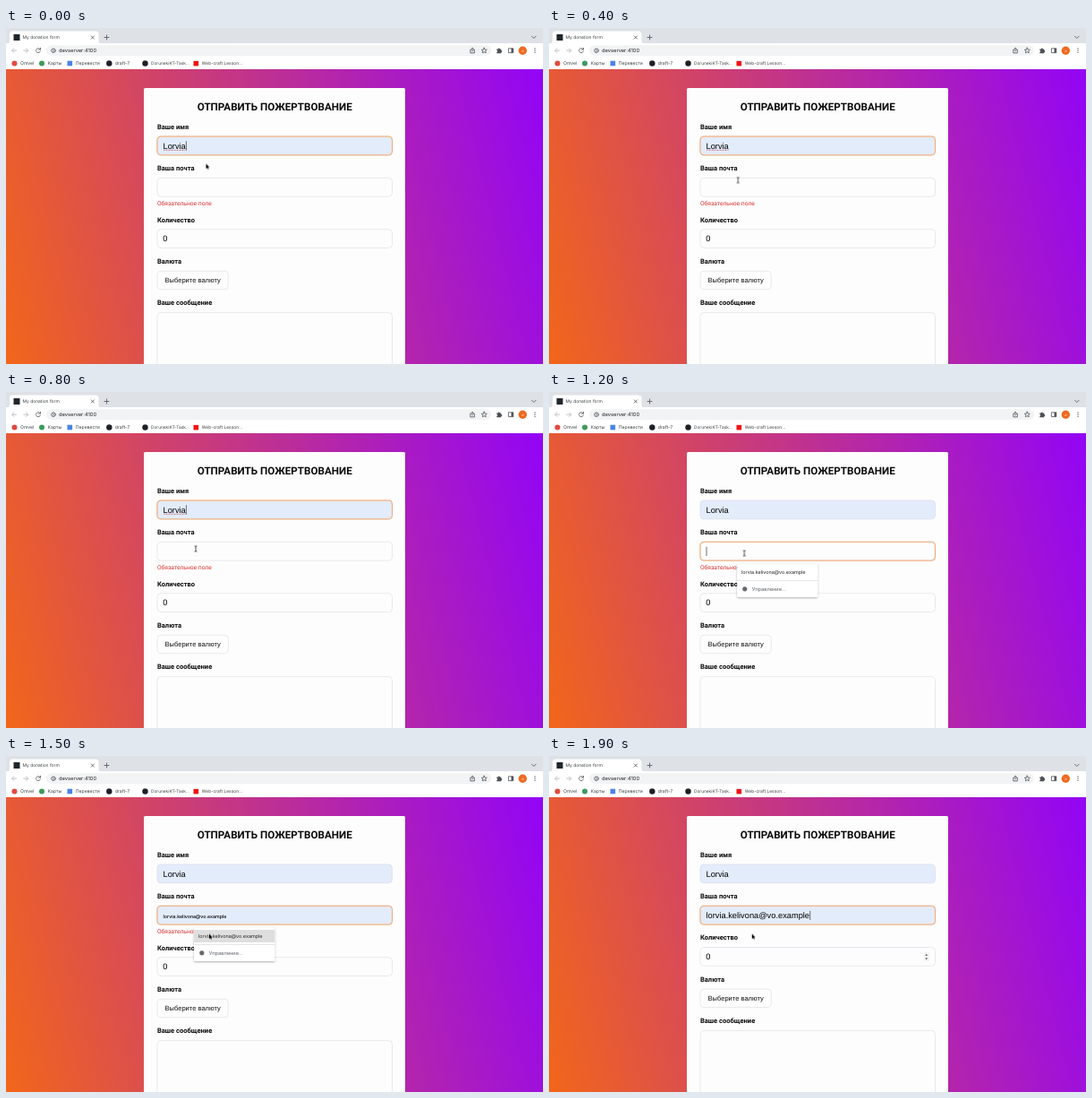
Write an HTML page that moves like this. It is 600 px wide and 375 px high and loops after 2000 ms.

```html
<!DOCTYPE html>
<html lang="ru">
<head>
<meta charset="utf-8">
<title>My donation form</title>
<style>
  html, body { margin: 0; width: 100%; height: 100%; overflow: hidden; background: #fff; }
  .page {
    position: absolute; left: 0; top: 46px; width: 600px; height: 329px;
    background: linear-gradient(76deg, #f2661a, #8f00ff 104%);
  }
  svg { position: absolute; left: 0; top: 0; display: block; }
  text { text-rendering: geometricPrecision; white-space: pre; }

  .ui { font-family: Inter, Roboto, sans-serif; font-size: 5.1px; fill: #3c4043; }
  .title { font: 700 11.65px Roboto, sans-serif; text-anchor: middle; fill: #0b0b0b; }
  .label { font: 700 7.55px Roboto, sans-serif; fill: #0b0b0b; }
  .error { font: 400 6.7px Roboto, sans-serif; fill: #d9302c; }
  .value { font: 400 9.28px "Liberation Sans", Arial, sans-serif; fill: #000; }
  .button { font: 400 7.55px "Liberation Sans", Arial, sans-serif; fill: #111; }
  .hint { font: 400 5.45px Inter, Roboto, sans-serif; fill: #222; }

  .line { fill: none; stroke: #5f6368; stroke-width: .9; stroke-linecap: round; stroke-linejoin: round; }
  .faint { stroke: #b9bcc0; }
  .box { fill: #fefdfe; stroke: #e9e8ec; stroke-width: 1; }
  .filled { fill: #e3ecfb; stroke: #dfe4ee; }
  .glow { fill: none; stroke: #f8e3d2; stroke-width: 1.8; }
  .ring { fill: none; stroke: #e8a472; stroke-width: .8; }
  .caret { stroke: #333; stroke-width: .7; }

  /* Every part shares the two-second clock and changes in hard steps. */
  .act { animation: 2s step-end infinite; }
  .name-focus { animation-name: nameFocus; }
  .name-caret { animation-name: nameCaret; }
  .mail-focus { animation-name: mailFocus; }
  .mail-caret { animation-name: mailCaret; }
  .mail-fill { animation-name: mailFill; }
  .preview { animation-name: preview; }
  .menu { animation-name: menu; }
  .done { animation-name: done; }
  .invalid { animation-name: invalid; }
  .lower { animation-name: lower; }
  .pointer { animation-name: move; }
  .arrow { animation-name: arrow; }
  .beam { animation-name: beam; }

  @keyframes nameFocus { 0% { visibility: visible } 50%, 100% { visibility: hidden } }
  @keyframes nameCaret {
    0% { visibility: visible } 15% { visibility: hidden }
    40% { visibility: visible } 50%, 100% { visibility: hidden }
  }
  @keyframes mailFocus { 0% { visibility: hidden } 50%, 100% { visibility: visible } }
  @keyframes mailCaret { 0% { visibility: hidden } 50% { visibility: visible } 70%, 100% { visibility: hidden } }
  @keyframes mailFill { 0% { visibility: hidden } 70%, 100% { visibility: visible } }
  @keyframes preview { 0% { visibility: hidden } 70% { visibility: visible } 85%, 100% { visibility: hidden } }
  @keyframes menu { 0% { visibility: hidden } 50% { visibility: visible } 85%, 100% { visibility: hidden } }
  @keyframes done { 0% { visibility: hidden } 85%, 100% { visibility: visible } }
  @keyframes invalid { 0% { visibility: visible } 85%, 100% { visibility: hidden } }
  @keyframes lower { 0% { transform: none } 85%, 100% { transform: translateY(-11.2px) } }
  @keyframes arrow { 0% { visibility: visible } 20% { visibility: hidden } 65%, 100% { visibility: visible } }
  @keyframes beam { 0% { visibility: hidden } 20% { visibility: visible } 65%, 100% { visibility: hidden } }
  @keyframes move {
    0% { transform: translate(223.5px, 151.5px) }
    5% { transform: translate(221px, 154px) }
    10% { transform: translate(217px, 159px) }
    15% { transform: translate(213px, 165px) }
    20% { transform: translate(211.2px, 169.8px) }
    25% { transform: translate(211px, 171.2px) }
    30% { transform: translate(210.8px, 172.4px) }
    35% { transform: translate(210.8px, 173.2px) }
    40% { transform: translate(212px, 175px) }
    45% { transform: translate(214px, 177px) }
    50% { transform: translate(217px, 179.5px) }
    60% { transform: translate(218.2px, 180px) }
    65% { transform: translate(221px, 188px) }
    70% { transform: translate(225px, 196px) }
    75% { transform: translate(227px, 198.5px) }
    85%, 100% { transform: translate(226.7px, 198.5px) }
  }
</style>
</head>
<body>
<div class="page"></div>
<svg width="600" height="375" viewBox="0 0 600 375">
  <defs>
    <filter id="shadow" x="-10%" y="-20%" width="120%" height="150%">
      <feDropShadow dx="0" dy=".8" stdDeviation="1.2" flood-opacity=".35"/>
    </filter>
    <rect id="field" x="169" y="121" width="262.5" height="20.8" rx="4"/>
  </defs>

  <!-- Browser frame -->
  <rect width="600" height="17.5" fill="#dee1e6"/>
  <rect y="17" width="600" height="29" fill="#fff"/>
  <path d="M1 17.5Q4 17.5 4 14V7Q4 3.5 7.5 3.5H100Q103.5 3.5 103.5 7V14Q103.5 17.5 106.5 17.5Z" fill="#fff"/>
  <rect x="8.5" y="7" width="7" height="7" fill="#20272c"/>
  <text class="ui" x="18.5" y="12.3" style="font-size:4.95px">My donation form</text>
  <path class="line" d="M95.2 8.9l3.2 3.2m0-3.2l-3.2 3.2M110 10.5h5m-2.5-2.5v5M587.5 9.2l2.3 2.3l2.3-2.3"/>

  <path class="line faint" d="M11.6 25.2H6.8m2.2-2.3l-2.3 2.3l2.3 2.3M19.8 25.2h4.8m-2.2-2.3l2.3 2.3l-2.3 2.3"/>
  <path class="line" d="M38.1 23.7A2.5 2.5 0 1 0 38.4 26M38.5 22.3v1.8h-1.8"/>
  <rect x="45" y="19.3" width="497" height="11.8" rx="5.9" fill="#f1f3f4"/>
  <circle class="line" cx="53" cy="25.2" r="2.3" stroke-width=".7"/>
  <path class="line" d="M53 25.1v1.2M53 23.9v.1" stroke-width=".7"/>
  <text class="ui" x="59" y="27.3" style="font-size:5.75px;fill:#202124">devserver:4100</text>
  <path class="line" d="M519.8 24.2h-1v3.7h4.6v-3.7h-1M521.1 26v-3.7m-1.2 1.1l1.2-1.2l1.2 1.2" stroke-width=".7"/>
  <path class="line" d="M534.3 22.1l.9 2l2.1.2l-1.6 1.4l.5 2.1l-1.9-1.1l-1.9 1.1l.5-2.1l-1.6-1.4l2.1-.2z" stroke-width=".7"/>
  <path d="M548.3 23.4h1.5a1 1 0 0 1 2 0h1.5v1.5a1 1 0 0 1 0 2v1.4h-5v-1.6a.9.9 0 0 0 0-1.8z" fill="#4d5156"/>
  <rect class="line" x="561.8" y="22.8" width="5" height="4.8"/>
  <rect x="564.5" y="22.8" width="2.3" height="4.8" fill="#4d5156"/>
  <circle cx="577.3" cy="25.2" r="4.7" fill="#ee6a20"/>
  <text x="577.3" y="26.6" text-anchor="middle" font-family="Roboto, sans-serif" font-size="4" fill="#fff">л</text>
  <g fill="#5f6368">
    <circle cx="591" cy="23" r=".7"/><circle cx="591" cy="25.2" r=".7"/><circle cx="591" cy="27.4" r=".7"/>
  </g>

  <!-- Bookmarks -->
  <circle cx="9.5" cy="39.5" r="3" fill="#e04a3f"/>
  <circle cx="40" cy="39.5" r="3" fill="#3f9a5b"/>
  <rect x="68.5" y="36.7" width="5.6" height="5.6" fill="#4a83e8"/>
  <circle cx="115.3" cy="39.5" r="3.2" fill="#1d2125"/>
  <circle cx="155.5" cy="39.5" r="3.2" fill="#1d2125"/>
  <rect x="209.5" y="36.8" width="5.6" height="5.6" fill="#f01414"/>
  <g class="ui">
    <text x="16" y="41.3">Omvel</text>
    <text x="46.6" y="41.3">Карты</text>
    <text x="77.8" y="41.3">Перевести</text>
    <text x="121.8" y="41.3">draft-7</text>
    <text x="162" y="41.3" style="font-size:4.8px">DorunekiKT-Task...</text>
    <text x="218.8" y="41.3" style="font-size:4.9px">Web-craft Lesson...</text>
  </g>

  <!-- Form -->
  <rect x="154" y="67" width="292" height="320" rx="1.5" fill="#fefdfe"/>
  <text class="title" x="300.3" y="92.4">ОТПРАВИТЬ ПОЖЕРТВОВАНИЕ</text>

  <text class="label" x="169" y="113">Ваше имя</text>
  <use href="#field" class="box filled"/>
  <g class="act name-focus">
    <use href="#field" class="glow"/>
    <use href="#field" class="ring"/>
    <path d="M176 136.3H200.5" stroke="#c0585c" stroke-width=".8" stroke-dasharray="1 .5"/>
  </g>
  <text class="value" x="175.5" y="134.6">Lorvia</text>
  <path class="act name-caret caret" d="M201.4 126.3v10.4"/>

  <text class="label" x="169" y="159.2">Ваша почта</text>
  <g transform="translate(0 46.3)">
    <use href="#field" class="box"/>
    <use href="#field" class="act mail-fill box filled"/>
    <g class="act mail-focus">
      <use href="#field" class="glow"/>
      <use href="#field" class="ring"/>
    </g>
  </g>
  <path class="act mail-caret caret" d="M176 172.8v10.2"/>
  <text class="act preview hint" x="175.5" y="180.6" style="font-size:5.3px;font-weight:500;fill:#000">lorvia.kelivona@vo.example</text>
  <g class="act done">
    <text class="value" x="175.5" y="180.8">lorvia.kelivona@vo.example</text>
    <path class="caret" d="M291.7 172.8v10.2"/>
  </g>
  <text class="act invalid error" x="169" y="197.7">Обязательное поле</text>

  <g class="act lower">
    <text class="label" x="169" y="216.6">Количество</text>
    <use href="#field" class="box" y="103.7"/>
    <text class="value" x="175.3" y="238.4">0</text>
    <g class="act done">
      <rect x="418.5" y="230.2" width="6.4" height="10.2" rx="1" fill="#f2f1f3"/>
      <path d="M420.3 234l1.4-1.8l1.4 1.8zM420.3 236.6l1.4 1.8l1.4-1.8z" fill="#444"/>
    </g>
    <text class="label" x="169" y="262.8">Валюта</text>
    <rect class="box" x="169" y="271.3" width="79.3" height="20.5" rx="4"/>
    <text class="button" x="177.5" y="284.2">Выберите валюту</text>
    <text class="label" x="169" y="309">Ваше сообщение</text>
    <rect class="box" x="169" y="317.6" width="262.5" height="90" rx="4"/>
  </g>

  <!-- Suggestions -->
  <g class="act menu">
    <rect x="210.2" y="191.5" width="90" height="37.5" rx="1" fill="#fff" filter="url(#shadow)"/>
    <rect class="act preview" x="210.2" y="194" width="90" height="14" fill="#dedede"/>
    <text class="hint" x="215" y="203">lorvia.kelivona@vo.example</text>
    <path d="M210.2 210.5h90" stroke="#dcdcdc" stroke-width=".7"/>
    <circle cx="218.8" cy="219.8" r="2.6" fill="#666a6e"/>
    <text class="hint" x="226.8" y="221.7" style="font-size:5.7px;fill:#5f6368">Управление...</text>
  </g>

  <!-- Pointer -->
  <g class="act pointer">
    <path class="act arrow" d="M0 0V5.5L1.3 4.4L2.1 6.2L3 5.8L2.2 4H3.8Z" fill="#000" stroke="#fff" stroke-width=".6" paint-order="stroke"/>
    <path class="act beam" d="M-1.4-3.2Q0-3.2 0-2.4Q0-3.2 1.4-3.2M0-2.4V2.4M-1.4 3.2Q0 3.2 0 2.4Q0 3.2 1.4 3.2" fill="none" stroke="#222" stroke-width=".8"/>
  </g>
</svg>
</body>
</html>
```
